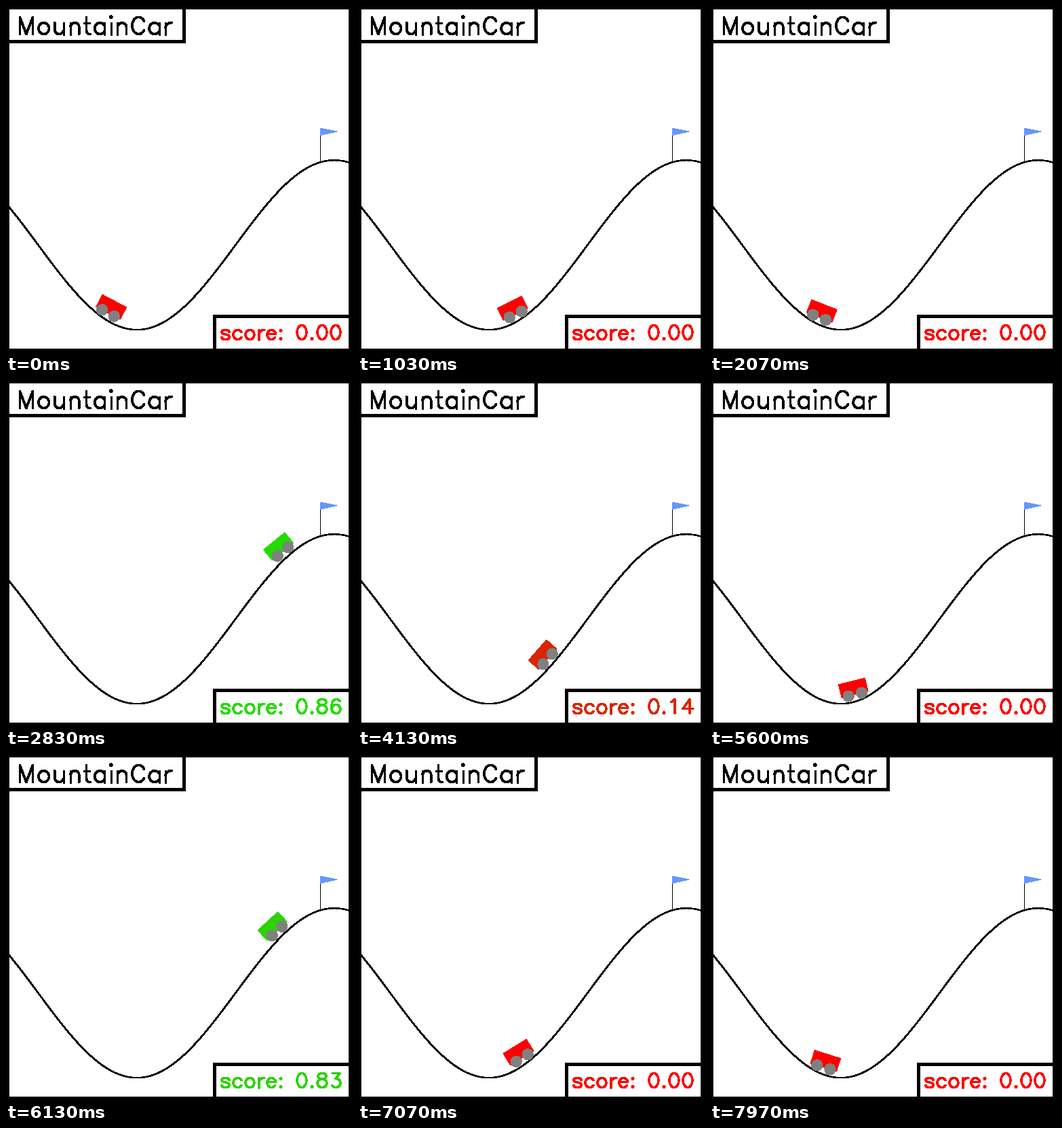
Write a matplotlib script that moves like this. It is 510 by 510 pixels and loops after 8000 ms.

```python
import numpy as np
import matplotlib.pyplot as plt
from matplotlib.animation import FuncAnimation
from matplotlib.collections import LineCollection
from matplotlib.patches import Circle, Polygon, Rectangle

SIZE, FRAMES, LOOP_MS = 510, 240, 8000
DPI = 102
PX = 72 / DPI  # points per pixel
SCALE = 500 / 1.8
GOAL = 0.45


# --- track -------------------------------------------------------------
def height(p):
    return np.sin(3 * p) * 0.45 + 0.55


def to_px(p):
    return 5 + (p + 1.2) * SCALE, 505 - height(p) * SCALE


# --- car motion: (frame, position, velocity) per episode ----------------
EPISODES = [
    [(0, -.693, .028), (10, -.37, .032), (20, -.17, 0), (24, -.208, -.019),
     (32, -.435, -.036), (40, -.735, -.036), (49, -.957, 0), (62, -.651, .042),
     (71.7, -.2, .0463), (80.3, .15, .0354), (85, .305, .0315), (91, .495, .032)],
    [(91, -.83, 0), (100, -.70, .028), (110, -.37, .033), (120, -.16, 0),
     (124, -.2017, -.019), (132, -.43, -.037), (140, -.735, -.037),
     (148, -.9545, -.007), (150.2, -.962, 0), (163.5, -.651, .0434),
     (172.8, -.2, .0491), (184, .283, .0377), (190, .51, .038)],
    [(190, -.79, 0), (200, -.66, .026), (210, -.38, .027), (220, -.225, 0),
     (225, -.26, -.016), (232, -.42, -.029), (240, -.656, -.03)],
]


def position(k):
    keys = next(e for e in EPISODES if k < e[-1][0])
    for (t0, p0, v0), (t1, p1, v1) in zip(keys, keys[1:]):
        if k < t1:
            break
    d = t1 - t0
    u = (k - t0) / d
    return ((1 + 2 * u) * (1 - u) ** 2 * p0 + u * (1 - u) ** 2 * d * v0
            + u * u * (3 - 2 * u) * p1 + u * u * (u - 1) * d * v1)


def score_of(p):
    if p < -np.pi / 6:
        return 0.0
    return float(np.clip((height(p) - 0.2) / (height(GOAL) - 0.2), 0, 1))


# --- single-stroke lettering, baseline 0, capitals 21 high ---------------
def arc(cx, cy, rx, ry, a0, a1):
    a = np.radians(np.linspace(a0, a1, max(4, int(abs(a1 - a0) / 18))))
    return list(zip(cx + rx * np.cos(a), cy + ry * np.sin(a)))


def turned(strokes, w, h):
    return [[(w - x, h - y) for x, y in s] for s in strokes]


def dot(y):
    return [(4, y), (5, y - 1), (6, y), (5, y + 1), (4, y)]


stem = [(4, 14), (4, 0)]
bowl = arc(9.5, 7, 6.5, 7, 32, 328)
n_shape = [stem, [(4, 10)] + arc(9.8, 8.5, 5.2, 5.5, 150, 0) + [(15, 0)]]
six = [arc(10.5, 6.5, 6.5, 6.5, 0, 360),
       arc(11, 12, 7, 9, 42, 180) + [(4, 6.5)]]

GLYPHS = {
    " ": (16, []),
    ".": (10, [dot(1)]),
    ":": (10, [dot(13), dot(1)]),
    "M": (24, [[(4, 0), (4, 21), (12, 0), (20, 21), (20, 0)]]),
    "C": (21, [arc(11, 10.5, 8, 10.5, 32, 328)]),
    "a": (19, [bowl, [(15, 14), (15, 0)]]),
    "c": (18, [bowl]),
    "e": (18, [[(3, 8), (15, 8)] + arc(9.3, 7, 6.3, 7, 10, 328)]),
    "i": (8, [[(3, 21), (4, 20), (5, 21), (4, 22), (3, 21)], stem]),
    "n": (19, n_shape),
    "o": (19, [arc(9.5, 7, 6.5, 7, 0, 360)]),
    "r": (13, [stem, arc(11, 8, 7, 6, 180, 90) + [(12, 14)]]),
    "s": (17, [[(14, 11), (13, 13), (10, 14), (7, 14), (4, 13), (3, 11),
                (4, 9), (6, 8), (11, 7), (13, 6), (14, 4), (14, 3),
                (13, 1), (10, 0), (7, 0), (4, 1), (3, 3)]]),
    "t": (12, [[(5, 21)] + arc(9, 4, 4, 4, 180, 270) + [(10, 0)],
               [(2, 14), (9, 14)]]),
    "u": (19, turned(n_shape, 19, 14)),
    "0": (20, [arc(10, 10.5, 7, 10.5, 0, 360)]),
    "1": (20, [[(6, 17), (8, 18), (11, 21), (11, 0)]]),
    "2": (20, [arc(10, 15.5, 6, 5.5, 175, -30) + [(3, 0), (17, 0)]]),
    "3": (20, [[(5, 21), (16, 21), (10, 13)]
               + arc(10.3, 6.5, 6.7, 6.5, 90, -150)]),
    "4": (20, [[(13, 0), (13, 21), (3, 7), (18, 7)]]),
    "5": (20, [[(15, 21), (5, 21), (4, 12)]
               + arc(10.3, 7, 6.7, 7, 140, -150)]),
    "6": (20, six),
    "7": (20, [[(3, 21), (17, 21), (7, 0)]]),
    "8": (20, [arc(10, 16.7, 6, 4.3, 0, 360), arc(10, 6.2, 7, 6.2, 0, 360)]),
    "9": (20, turned(six, 20, 21)),
}


def lettering(text, x, base, scale):
    lines = []
    for ch in text:
        width, strokes = GLYPHS[ch]
        lines += [[(x + a * scale, base - b * scale) for a, b in s]
                  for s in strokes]
        x += width * scale
    return lines


# --- stage ---------------------------------------------------------------
fig = plt.figure(figsize=(SIZE / DPI, SIZE / DPI), dpi=DPI, facecolor="white")
ax = fig.add_axes([0, 0, 1, 1])
ax.set_xlim(0, SIZE)
ax.set_ylim(SIZE, 0)
ax.axis("off")


def box(x, y, w, h, color):
    ax.add_patch(Rectangle((x, y), w, h, fc=color, lw=0, aa=False, zorder=5))


def pen_text(lines, color, width):
    pen = LineCollection(lines, colors=[color], linewidths=width * PX,
                         antialiaseds=False, capstyle="round",
                         joinstyle="round", zorder=6)
    ax.add_collection(pen, autolim=False)
    return pen


track = np.linspace(-1.2, 0.6, 100)
ax.plot(*to_px(track), color="black", lw=1.5 * PX, aa=False, zorder=1)

body = Polygon(np.zeros((4, 2)), fc="red", lw=0, aa=False, zorder=2)
wheels = [Circle((0, 0), 8, fc="#808080", lw=0, aa=False, zorder=3)
          for _ in range(2)]
for part in [body, *wheels]:
    ax.add_patch(part)

flag_x, flag_y = to_px(GOAL)
ax.plot([flag_x, flag_x], [flag_y, flag_y - 50], color="black", lw=PX,
        aa=False, zorder=4)
ax.add_patch(Polygon([(463, 180), (463, 190.5), (488, 185)], fc="#6496ff",
                     lw=0, aa=False, zorder=4))

for edge in [(0, 0, 510, 5), (0, 505, 510, 5), (0, 0, 5, 510), (505, 0, 5, 510)]:
    box(*edge, "black")
box(0, 0, 265, 55, "black")
box(5, 5, 255, 45, "white")
box(305, 455, 205, 55, "black")
box(310, 460, 195, 45, "white")

pen_text(lettering("MountainCar", 15.5, 41.5, 1.2), "black", 2.6)
label = pen_text([], "red", 2.4)

CORNERS = [(-20, 10), (-20, 30), (20, 30), (20, 10)]
HUBS = [(-10, 10), (10, 10)]


def update(k):
    p = position(k)
    gx, gy = to_px(p)
    tilt = np.cos(3 * p)
    c, s = np.cos(tilt), np.sin(tilt)

    def place(x, y):
        return gx + c * x - s * y, gy - s * x - c * y

    score = score_of(p)
    color = (1 - score, score, 0)
    body.set_xy([place(*q) for q in CORNERS])
    body.set_facecolor(color)
    for wheel, hub in zip(wheels, HUBS):
        wheel.set_center(place(*hub))
    label.set_segments(lettering(f"score: {score:.2f}", 315, 491.5, 1.0))
    label.set_color([color])
    return [body, *wheels, label]


anim = FuncAnimation(fig, update, frames=FRAMES, interval=LOOP_MS / FRAMES,
                     init_func=lambda: update(0), repeat=True, repeat_delay=0,
                     blit=False)
plt.show()
```
